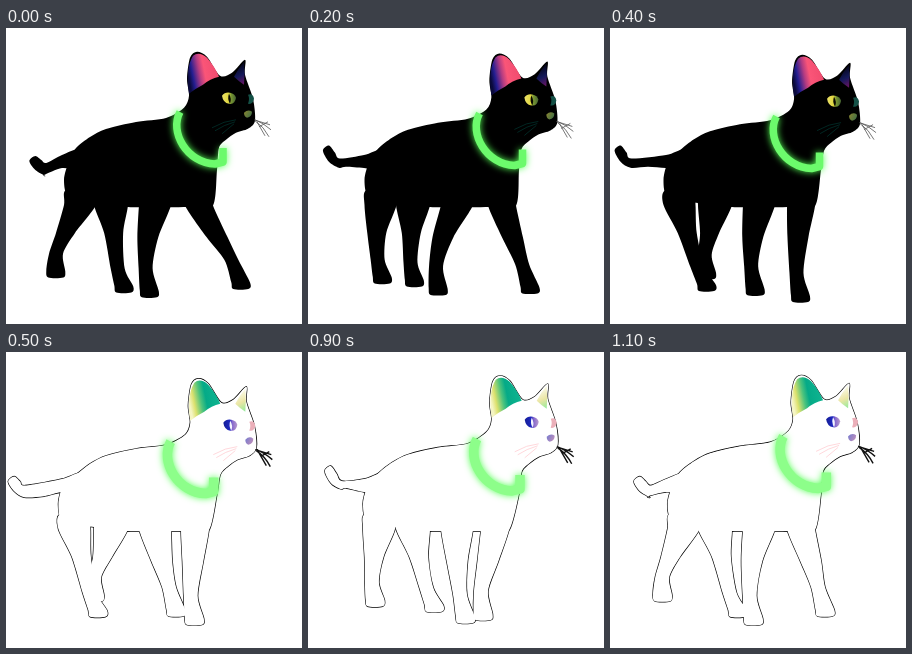
An HTML page with a canvas that plays this animation: 296x296 px, repeating every 1200 ms.

```html
<!DOCTYPE html>
<html lang="en">
<head>
<meta charset="utf-8">
<title>Walking cat</title>
<style>
  html, body { margin: 0; width: 100%; height: 100%; overflow: hidden; background: #fff; }
  canvas { display: block; }
</style>
</head>
<body>
<canvas id="stage" width="296" height="296"></canvas>
<script>
const ctx = document.getElementById('stage').getContext('2d');
const STEP = 100, STEPS = 12;
const { cos, sin, PI } = Math;

// Gait: stride is the sideways swing of the sole and sole its height;
// each joint follows a share of the stride.
const front = {
  stride: a => 23.2 * cos(a) + 13.6 * sin(a) + 11.4 * cos(2 * a) + 4.8 * sin(2 * a),
  sole: a => 267.3 - 4.1 * cos(a) + 1.5 * sin(a) - 2.2 * cos(2 * a) - 2.6 * sin(2 * a),
  knee: { x: 193, y: 209, share: 0.52, half: 10.5 },
  ankle: { x: 195, lift: 29, share: 0.88 },
  foot: 199.6
};
const hind = {
  stride: a => -16 * cos(a) + 11.5 * sin(a) - 6.4 * cos(2 * a) - 3.6 * sin(2 * a),
  sole: a => 257 + 8 * cos(a - 2.8),
  knee: { x: 68, y: 205, share: 0.38, half: 9.5 },
  ankle: { x: 68, lift: 24, share: 0.8 },
  foot: 71.7
};

// Closed smooth curve through all points.
function blob(pts) {
  const p = new Path2D(), n = pts.length;
  const at = i => pts[(i + n) % n];
  p.moveTo(...pts[0]);
  for (let i = 0; i < n; i++) {
    const [a, b, c, d] = [at(i - 1), at(i), at(i + 1), at(i + 2)];
    p.bezierCurveTo(b[0] + (c[0] - a[0]) / 7, b[1] + (c[1] - a[1]) / 7,
      c[0] - (d[0] - b[0]) / 7, c[1] - (d[1] - b[1]) / 7, c[0], c[1]);
  }
  p.closePath();
  return p;
}

function leg({ stride, sole, knee, ankle, foot }, a, shift, hip, half) {
  const s = stride(a), fy = sole(a), ay = fy - ankle.lift;
  const kx = knee.x + shift + knee.share * s;
  const ax = ankle.x + shift + ankle.share * s;
  const fx = foot + shift + s;
  return blob([
    [hip - half + 2, 162], [hip - half, 177], [kx - knee.half, knee.y], [ax - 7, ay],
    [fx - 9, fy - 7], [fx - 7, fy], [fx + 8, fy], [fx + 10, fy - 6],
    [ax + 7, ay], [kx + knee.half, knee.y], [hip + half, 177], [hip + half - 2, 162]
  ]);
}

function tail(a) {
  const twice = cos(2 * a);
  const x = 13 + 11 * cos(a + 0.35), y = 126 + 7 * twice;
  const top = 132 + 3 * twice, low = 142.5 + 5.5 * twice;
  return blob([[76, 121], [56, 127], [x + 17, top], [x + 12, (top + y) / 2 - 2], [x + 6, y - 5],
    [x, y], [x + 6, low - 6], [x + 16, low], [38, low - 1], [56, 140], [74, 141]]);
}

function torso(rump, sag, chest, dx, dy) {
  const head = [
    [178, 79], [183, 67], [181, 50], [184, 29], [191, 23], [201, 28], [214, 47],
    [226, 44], [239, 31], [239, 46], [247, 70], [249, 92], [242, 100],
    [230, 104], [220, 111], [213, 119]
  ].map(([x, y]) => [x + dx, y + dy]);
  const back = [[70, 120], [84, 109], [100, 101], [130, 94], [160, 90]]
    .map(([x, y]) => [x, y + sag]);
  return blob([[rump + 5, 170], [rump, 152], [rump + 5, 133], ...back, ...head,
    [211, 142], [chest, 178], [185, 179], [120, 179], [88, 175]]);
}

function face(light, dx, dy) {
  const tone = (r, g, b) => light ? `rgb(${255 - r},${255 - g},${255 - b})` : `rgb(${r},${g},${b})`;
  const fade = (x0, y0, x1, y1, stops) => {
    const g = ctx.createLinearGradient(x0, y0, x1, y1);
    stops.forEach(([at, ...rgb]) => g.addColorStop(at, tone(...rgb)));
    return g;
  };
  const fill = (d, style) => {
    ctx.fillStyle = style;
    ctx.fill(new Path2D(d));
  };
  const line = (d, style, width) => {
    ctx.strokeStyle = style;
    ctx.lineWidth = width;
    ctx.stroke(new Path2D(d));
  };

  ctx.save();
  ctx.translate(dx, dy);
  fill('M183 65Q179 40 187 27Q193 22 201 29Q209 38 213 48Q204 50 197 56Q189 60 183 65Z',
    fade(182, 46, 212, 40, [[0, 10, 10, 60], [0.15, 35, 30, 145], [0.38, 180, 60, 130],
      [0.55, 250, 85, 120], [1, 240, 75, 110]]));
  fill('M228 48Q232 40 238 33Q239 45 238 56Q232 52 228 48Z',
    fade(229, 38, 238, 56, [[0, 5, 5, 25], [0.5, 20, 25, 90], [1, 110, 20, 100]]));

  fill('M216 67Q219 63 224 64Q229 65 230 69Q229 76 223 75Q217 74 216 67Z',
    fade(216, 69, 230, 69, [[0, 235, 225, 105], [0.45, 225, 215, 65], [0.65, 120, 150, 50], [1, 70, 100, 50]]));
  fill('M223 65Q226 70 224 75Q221 70 223 65Z', tone(10, 10, 0));
  fill('M242 66Q247 64 248 70Q247 76 242 75Q244 70 242 66Z', tone(20, 80, 70));
  fill('M238 84Q242 80 246 83Q246 88 241 89Q238 88 238 84Z',
    fade(238, 84, 246, 88, [[0, 130, 130, 50], [1, 60, 110, 70]]));

  line('M230 91Q218 92 206 99M229 93Q218 96 209 102M228 95L216 105', tone(0, 55, 50), 0.7);
  if (light) ctx.translate(0, 3);
  line('M248 91L264 96M249 91Q257 94 265 101M249 92Q258 98 263 108M251 93L259 107M253 98L262 93',
    light ? '#111' : '#555', light ? 1.4 : 0.8);
  ctx.restore();
}

function collar(light, dx, dy) {
  ctx.save();
  ctx.translate(dx, dy);
  ctx.lineJoin = 'round';
  ctx.shadowColor = '#5f5';
  ctx.shadowBlur = 7;
  ctx.lineWidth = light ? 9.5 : 7.5;
  ctx.strokeStyle = light ? '#8dfe8a' : '#6cfa6c';
  ctx.stroke(new Path2D('M174 84C163 104 181 135 209 136L217 134L217 120'));
  ctx.restore();
}

function draw(step) {
  const a = step / STEPS * 2 * PI, sway = 1 - cos(a);
  const light = step % 2 === 1;
  const rump = 55 + 3 * cos(a), chest = 204 + 4 * cos(a - 0.8);
  const dx = 0.7 * sway, dy = 2 + 1.2 * (sin(a) - cos(a));
  const parts = [
    tail(a),
    torso(rump, 1.5 * sway, chest, dx, dy),
    leg(hind, a, 0, rump + 16, 16),
    leg(hind, a + PI, 36, 105, 17),
    leg(front, a + PI, -45, 149, 16),
    leg(front, a, 0, chest - 14, 14)
  ];

  ctx.fillStyle = '#fff';
  ctx.fillRect(0, 0, 296, 296);
  if (light) {
    ctx.strokeStyle = '#000';
    ctx.lineWidth = 1.3;
    parts.forEach(p => ctx.stroke(p));
  }
  ctx.fillStyle = light ? '#fff' : '#000';
  parts.forEach(p => ctx.fill(p));
  face(light, dx, dy);
  collar(light, -5 * sway, 3 * sway);
}

const start = performance.now();
let shown = -1;
function tick() {
  const step = Math.floor((performance.now() - start) / STEP) % STEPS;
  if (step !== shown) draw(shown = step);
  requestAnimationFrame(tick);
}
tick();
</script>
</body>
</html>
```
